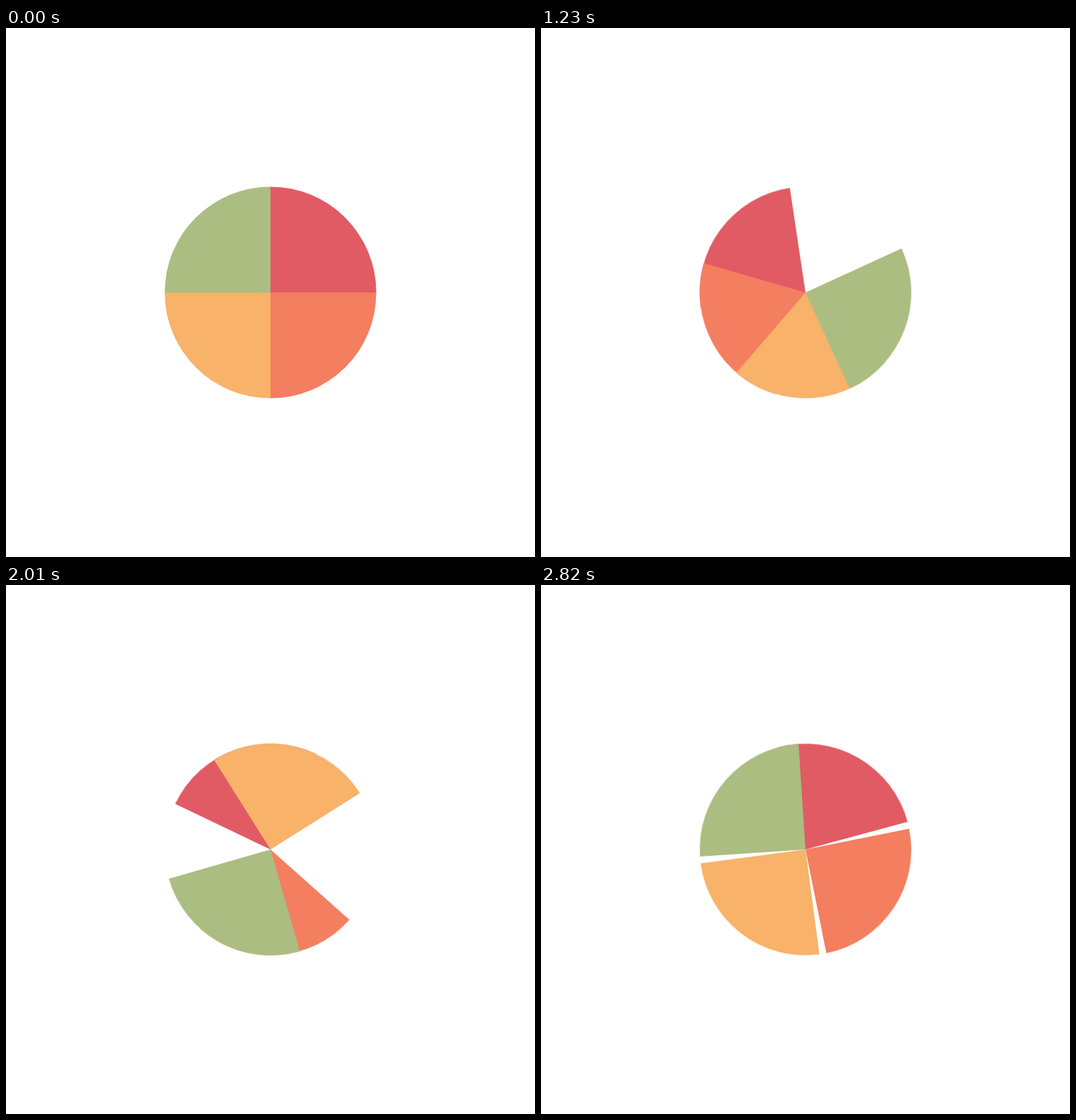
Recreate the animation shown at these times as an HTML page. Size 748 by 748 pixels, loop 2.85 s.

```html
<!DOCTYPE html>
<html lang="en">
<head>
<meta charset="utf-8">
<title>Pie spinner</title>
<style>
  html, body { margin: 0; width: 100%; height: 100%; overflow: hidden; background: #fff; }
  svg { display: block; }
  path { transform-origin: 0 0; }
</style>
</head>
<body>
<svg width="748" height="748"><g id="pie" transform="translate(374 374)"></g></svg>
<script>
  const LOOP = 2850, STEPS = 95, R = 149.6;
  const colors = ['#e15b64', '#f47e60', '#f8b26a', '#abbd81'];
  const pie = document.getElementById('pie');

  // Each quarter makes one turn fewer per loop than the one beneath it.
  colors.forEach((color, i) => {
    const wedge = document.createElementNS('http://www.w3.org/2000/svg', 'path');
    wedge.setAttribute('d', `M0 0V${-R}A${R} ${R} 0 0 1 ${R} 0Z`);
    wedge.setAttribute('fill', color);
    pie.append(wedge);

    const start = i * 90;
    const turns = colors.length - i;
    wedge.animate(
      { transform: [`rotate(${start}deg)`, `rotate(${start + 360 * turns}deg)`] },
      // The small lead keeps step edges clear of rounding.
      { duration: LOOP, iterations: Infinity, easing: `steps(${STEPS})`, delay: -1 }
    );
  });
</script>
</body>
</html>
```
